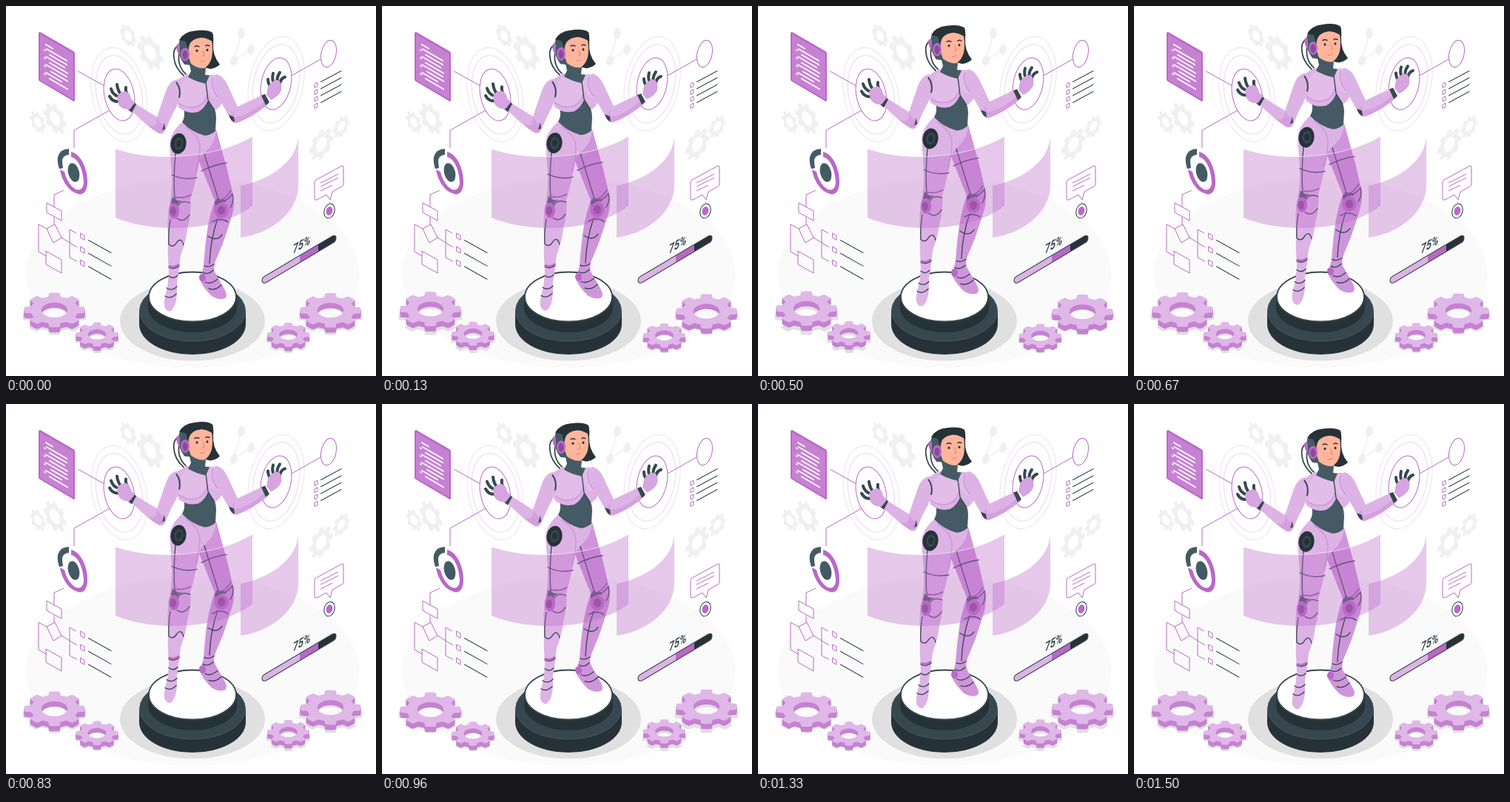
An HTML page that plays this animation: 500 by 500 pixels, repeating every 1.54 s.

```html
<!DOCTYPE html>
<html lang="en">
<head>
<meta charset="utf-8">
<title>Robot hologram</title>
<style>
html, body { margin: 0; width: 100%; height: 100%; overflow: hidden; background: #fff; }
svg { display: block; width: 100vw; height: 100vh; }
.ln { fill: none; stroke: #ba68c8; stroke-width: 1; }
.dk { fill: none; stroke: #37474f; stroke-width: 1.1; stroke-linecap: round; }
.seam { fill: none; stroke: #37474f; stroke-width: 1.3; stroke-linecap: round; }
.finger { fill: none; stroke: #37474f; stroke-width: 4; stroke-linecap: round; }
.pale { fill: #e1bde8; }
.light { fill: #ddb3e6; }
.hand { fill: #d6a4e0; }
.mid { fill: #cf95db; }
.purple { fill: #ba68c8; }
.plum { fill: #8a4b96; }
.slate { fill: #455a64; }
.steel { fill: #37474f; }
.ink { fill: #263238; }
</style>
</head>
<body>
<svg viewBox="0 0 500 500" xmlns="http://www.w3.org/2000/svg">
  <ellipse cx="252" cy="361" rx="225.500" ry="128" fill="#fafafa"/>
  <g id="faint" fill="#f0f0f0" fill-rule="evenodd"></g>
  <g fill="#f0f0f0" stroke="#f0f0f0" stroke-width="1.500">
    <path d="M331 59L308 74L318 37" fill="none"/>
    <ellipse cx="318" cy="37" rx="4" ry="6.500" transform="rotate(14 318 37)"/>
    <ellipse cx="331" cy="59" rx="4" ry="6.500" transform="rotate(14 331 59)"/>
    <ellipse cx="308" cy="74" rx="4" ry="6.500" transform="rotate(14 308 74)"/>
  </g>

  <!-- platform -->
  <ellipse cx="252" cy="425.500" rx="98" ry="54" fill="#e0e0e0"/>
  <path class="ink" d="M180 411V430A72 41 0 0 0 324 430V411Z"/>
  <ellipse class="steel" cx="252" cy="412" rx="71.500" ry="41" stroke="#455a64"/>
  <path class="ink" d="M192 393V407A60 34 0 0 0 312 407V393Z"/>
  <ellipse cx="252" cy="393" rx="59" ry="33.500" fill="#fff" stroke="#37474f" stroke-width="1.800"/>

  <g id="rings" fill="none"></g>

  <g id="body">
    <!-- far leg -->
    <path class="mid" d="M258 200Q266 180 284 166Q292 195 299 220L306 250Q310 265 306 280Q300 300 293 320L283 344Q279 355 284 362L296 383Q300 391 296 394Q288 397 278 391Q267 380 263 371Q264 362 267 350Q269 320 273 296Q276 280 282 262L262 212Z"/>
    <path class="seam" d="M268 199Q277 228 287 260M264 222Q282 213 298 211M286 286Q276 316 275 347M273 310Q285 318 292 308M279 291Q290 284 300 291M268 350Q274 353 281 348M266 359Q273 363 280 356M269 372Q276 376 286 368M274 381Q283 384 291 376"/>
    <path class="slate" d="M282 264L286 258Q291 262 295 260L298 264Q288 262 283 272Z"/>
    <path d="M284 261Q296 263 304 248" fill="none" stroke="#8a4b96" stroke-width="1.500"/>
    <path d="M296 262Q302 259 306 253Q309 262 303 272" class="seam" stroke-width="2"/>
    <ellipse class="purple" cx="291" cy="275" rx="9.500" ry="10.500"/>
    <ellipse class="plum" cx="291" cy="275" rx="5" ry="6"/>
    <ellipse class="purple" cx="265.500" cy="366" rx="4.500" ry="5.500"/>
    <!-- near leg -->
    <path class="light" d="M238 156Q222 170 221 186L224 225Q225 246 222 262Q217 285 219 310Q218 335 220 360L218 380Q213 395 214 405Q217 413 223 411Q230 405 231 388L231 374Q234 355 236 336Q244 315 245 300Q251 280 249 262Q257 235 261 207Q265 200 273 193Q283 183 284 166Q268 179 238 156Z"/>
    <path d="M243 163Q261 174 262 190Q262 205 257 224" fill="none" stroke="#cf95db" stroke-width="1.500"/>
    <path class="seam" d="M229 198Q226 232 228 260M224 227Q241 235 258 231M249 265Q236 260 232 270M231 286Q240 293 248 281M222 288Q219 305 220 321Q226 327 231 318Q237 311 240 322M220 352Q227 356 234 350M220 364Q226 369 232 363M217 380Q224 385 231 378M215 391Q222 396 230 388"/>
    <path class="slate" d="M225 257L232 262L238 262Q233 264 231 269L223 266Z"/>
    <path d="M227 257Q240 260 250 254" fill="none" stroke="#8a4b96" stroke-width="1.500"/>
    <path d="M220 350Q227 354 234 348" fill="none" stroke="#ba68c8" stroke-width="2.500"/>
    <ellipse class="purple" cx="227" cy="276" rx="7" ry="10.500"/>
    <ellipse class="plum" cx="226" cy="276.500" rx="4" ry="6"/>
    <g transform="rotate(8 233 185)">
      <ellipse class="ink" cx="233" cy="185" rx="10.500" ry="14"/>
      <ellipse class="steel" cx="233.500" cy="185" rx="6" ry="8.500"/>
      <ellipse class="ink" cx="233.500" cy="185" rx="3.500" ry="5"/>
    </g>
    <!-- torso -->
    <path class="slate" d="M240 137Q254 145 266 135L275 124Q284 138 284 150L283 168Q276 174 268 174Q250 169 238 156Q243 148 240 137Z"/>
    <path class="light" d="M246 91Q236 95 229 101L234 122Q231 131 233 136Q246 146 260 142Q269 137 273 126L283 140Q294 132 296 118Q293 100 286 92L272 92Z"/>
    <path class="pale" d="M246 95Q236 100 236 116Q233 125 233 130Q245 139 259 134Q270 128 272 116L269 103Q256 101 246 95ZM274 94Q270 102 275 118Q281 127 293 124Q296 118 293 108Q289 96 284 92Z"/>
    <path d="M233 130Q246 140 261 134Q270 129 272 118" fill="none" stroke="#cf95db" stroke-width="1.500"/>
    <path class="seam" d="M270 102L273 126L281 139"/>
    <path class="slate" d="M247 74L270 83L269 92L275 93L270 104Q256 101 246 95L250 87Z"/>
    <!-- arms -->
    <path class="light" d="M231 98Q221 100 216 114L204 149L175 131L168 139Q190 161 206 171Q213 174 216 166Q222 150 229 138L236 122Q238 107 231 98Z"/>
    <path d="M230 102Q237 111 234 123" fill="none" stroke="#37474f" stroke-width="2"/>
    <path class="steel" d="M214 157L215 165L210 168Z"/>
    <path class="mid" d="M204 149L210 158L214 157L211 170L207 171Q199 167 190 159Q205 166 204 149Z" opacity=".65"/>
    <path class="steel" d="M172 128L176 132L170 143L165 139Z"/>
    <g class="finger">
      <path d="M153 128Q144 129 140 121"/>
      <path d="M153 122Q144 119 142 111"/>
      <path d="M156 119Q151 114 150 105"/>
      <path d="M165 120Q161 115 162 109"/>
    </g>
    <path class="hand" d="M150 122Q153 115 161 114Q168 116 169 124L174 130L167 139Q156 139 152 132Z"/>
    <path class="light" d="M284 91Q294 93 300 107L313 135L347 119L355 131Q334 149 312 157Q305 158 302 149L290 128Q275 108 284 91Z"/>
    <path d="M280 95Q275 107 286 122" fill="none" stroke="#cf95db" stroke-width="1.500"/>
    <path class="mid" d="M313 135Q307 141 309 149Q329 147 350 127L355 131Q334 149 312 157Q306 157 302 149Z" opacity=".6"/>
    <path class="steel" d="M301 146L308 149L309 156Q304 155 301 146ZM345 120L350 118L356 129L351 133Z"/>
    <g class="finger">
      <path d="M359 109Q354 105 354 98"/>
      <path d="M362 104Q359 97 361 90"/>
      <path d="M367 103Q365 96 370 89"/>
      <path d="M370 104Q371 97 377 95"/>
    </g>
    <path class="hand" d="M354 108Q359 99 368 99Q374 103 372 113Q369 121 358 126L352 119Z"/>
    <!-- head -->
    <path class="dk" d="M235 52Q225 55 227 69Q228 82 240 93M234 62Q231 80 243 91" style="stroke-width:1.800"/>
    <path class="ink" d="M262 40L279 37Q281 42 280 50Q279 66 289 78Q284 83 276 84L268 82Z"/>
    <path class="slate" d="M233 53Q234 43 239 39L251 42L250 79L241 78Q232 66 233 53Z"/>
    <path d="M248 47Q256 44 262 41Q271 42 278 46Q280 58 278 69Q275 79 268 83Q259 84 250 77L246 66Z" fill="#ffb59b"/>
    <path class="ink" d="M234 45Q240 34 255 32.500Q271 30 279 35Q281 41 279 47Q270 41 262 42Q251 44 248 51L246 57L243 47Z"/>
    <path d="M255 54Q258 52 261 54M270 53Q272 51 275 53" class="dk" style="stroke:#263238;stroke-width:1.400"/>
    <ellipse class="ink" cx="258" cy="59.500" rx="1.500" ry="1.800"/>
    <ellipse class="ink" cx="272" cy="58.500" rx="1.500" ry="1.800"/>
    <path d="M266 59L268 66L265 67M262 74Q266 75 269 72" fill="none" stroke="#e5806a"/>
    <path d="M230 53Q232 48 235 52L235 66Q231 63 230 53Z" class="purple"/>
    <ellipse class="purple" cx="242" cy="64.500" rx="6" ry="9"/>
    <ellipse class="plum" cx="242" cy="65" rx="3.500" ry="6"/>
  </g>

  <!-- hologram screens -->
  <g fill="#ba68c8" fill-opacity=".36">
    <path d="M148 193C205 212 285 205 333 176V270C290 305 200 308 148 286Z"/>
    <path d="M317 243C355 235 392 212 395 177V246C392 282 355 308 317 313Z"/>
  </g>
  <path d="M148 193C205 212 285 205 333 176" fill="none" stroke="#fff" stroke-opacity=".6"/>

  <!-- document -->
  <path class="purple" d="M46 35L91 61Q93 62 93 64V128Q92 130 90 128L46 102Q44 101 44 99V37Q44 35 46 35Z"/>
  <path d="M46 38L91 64V126L46 100Z" fill="#c781d3"/>
  <g id="rows" transform="matrix(1 .58 0 1 45 36)" stroke="#fff" stroke-width="2" stroke-linecap="round"></g>

  <g class="ln">
    <path d="M97 88L133 108M140 141L92 168V192M386 94L425 72"/>
    <ellipse cx="436" cy="64.500" rx="10" ry="18.500" transform="rotate(12 436 64.500)"/>
    <path d="M78 249L65 255V272M55 266L75 277V290L55 279ZM65 285V295M55 301L66 295L75 313L64 320ZM55 301L44 295V332L54 338M54 331L75 343V361L54 349ZM75 313L96 326M95 307L86 302V340L96 345"/>
    <path d="M419 235L454 216Q456 215 456 218V241Q456 243 454 244L441 251L438 262L433 255L420 262Q417 263 417 260V239Q417 236 419 235ZM425 239L449 227M425 244L449 232M425 250L441 242"/>
  </g>
  <g id="lists"></g>

  <!-- donut chart -->
  <path class="purple" d="M88 197C102 200 111 222 110 240C109 253 102 257 95 253C83 249 75 234 73 221L79 224C81 234 88 245 95 248C102 250 105 245 105 237C104 222 98 206 88 204Z"/>
  <path class="slate" d="M72 220Q69 211 70 204Q73 193 85 193L85 201Q77 202 76 208Q76 213 77 219Z"/>
  <ellipse class="slate" cx="91.500" cy="225" rx="7.500" ry="13" transform="rotate(-14 91.500 225)"/>

  <g transform="rotate(16 437 277)">
    <ellipse cx="437" cy="277" rx="7" ry="10" fill="#fff" stroke="#37474f" stroke-width="1.100"/>
    <ellipse class="purple" cx="437" cy="277" rx="4.300" ry="6"/>
  </g>

  <!-- progress bar -->
  <clipPath id="bar"><path d="M350 365L441 311Q446 309 446 313Q446 318 442 320L351 374Q346 375 346 371Q346 367 350 365Z"/></clipPath>
  <g clip-path="url(#bar)">
    <path class="light" d="M340 300H397V380H340Z"/>
    <path class="purple" d="M397 300H422V380H397Z"/>
    <path class="ink" d="M422 300H450V380H422Z"/>
  </g>
  <path class="dk" d="M350 365L441 311Q446 309 446 313Q446 318 442 320L351 374Q346 375 346 371Q346 367 350 365Z"/>
  <text transform="matrix(.76 -.44 -.14 1.080 387 335)" font-family="Roboto, Arial, sans-serif" font-weight="600" font-size="16.500" fill="#37474f">75%</text>

  <g id="gears" fill-rule="evenodd"></g>
</svg>
<script>
const LOOP = 1540;
const $ = id => document.getElementById(id);

function add(parent, tag, attrs) {
  const el = document.createElementNS('http://www.w3.org/2000/svg', tag);
  for (const k in attrs) el.setAttribute(k, attrs[k]);
  return parent.appendChild(el);
}

function gearPath(R, hole, teeth = 8) {
  const root = R * 0.79;
  const at = (r, a) => `${(r * Math.cos(a)).toFixed(2)} ${(r * Math.sin(a)).toFixed(2)}`;
  let d = '';
  for (let i = 0; i < teeth; i++) {
    const a = i * 2 * Math.PI / teeth;
    d += (i ? `A${root} ${root} 0 0 1 ` : 'M') + at(root, a - 0.26);
    d += `L${at(R, a - 0.17)}A${R} ${R} 0 0 1 ${at(R, a + 0.17)}L${at(root, a + 0.26)}`;
  }
  return `${d}A${root} ${root} 0 0 1 ${at(root, -0.26)}Z` +
    `M${hole} 0A${hole} ${hole} 0 1 0 ${-hole} 0A${hole} ${hole} 0 1 0 ${hole} 0Z`;
}

// wall gears: x, y, radius, slope
[[195, 63, 21, .5], [165, 40, 13.5, .5], [43, 157, 13, .5], [66, 152, 18.5, .5],
 [426, 187, 19, -.5], [453, 163, 13.5, -.5]].forEach(([x, y, r, k]) =>
  add($('faint'), 'path', { d: gearPath(r, r * .46), transform: `matrix(.84 ${k} 0 1.05 ${x} ${y})` }));

// rings around the hands
[[153, 120, -12], [365, 105, 12]].forEach(([x, y, tilt]) =>
  [[1, '#ba68c8'], [1.52, '#ecd6f0'], [1.82, '#f0e0f3']].forEach(([s, stroke]) =>
    add($('rings'), 'ellipse', { cx: x, cy: y, rx: 20 * s, ry: 35.5 * s, stroke, transform: `rotate(${tilt} ${x} ${y})` })));

// text rows of the document
[[9, 18], [10, 37], [14, 37], [9, 34], [14, 38], [9, 37], [16, 38], [9, 30], [14, 38]].forEach(([a, b], i) => {
  const y = 11 + i * 5.4;
  add($('rows'), 'path', { d: `M${a} ${y}H${b}` });
  if (i % 2) add($('rows'), 'path', { d: `M7 ${y + 3}h1` });
});

// check lists
function item(x, y, w, h, k, x1, x2, yl) {
  add($('lists'), 'path', { class: 'ln', d: `M${x} ${y}l${w} ${w * k}v${h}l${-w} ${-w * k}Z` });
  add($('lists'), 'path', { class: 'dk', d: `M${x1} ${yl}L${x2} ${yl + (x2 - x1) * k}` });
}
for (let i = 0; i < 4; i++) item(417, 105.5 + i * 9.3, 4, 5, -.54, 425.5, 453, 102.5 + i * 9.3);
for (let i = 0; i < 3; i++) item(100.5, 307 + i * 18, 5.5, 6, .56, 111.5, 142, 316.5 + i * 17.8);

// floor gears: x, y, radius, depth, swing
const gears = [[65.5, 411, 41, 7, 2.6], [123, 444, 28.5, 6, 2], [438.5, 411, 41, 7, -2.6], [381.5, 444, 28.5, 6, -2]]
  .map(([x, y, r, depth, swing]) => {
    const d = gearPath(r, r * .43);
    const layer = (parent, dy, fill, s = 1) =>
      add(parent, 'path', { d, fill, transform: `translate(0 ${dy}) scale(${s} ${s * .57})` });
    const base = add($('gears'), 'g', { transform: `translate(${x} ${y})` });
    layer(base, depth + 2, '#e0e0e0', 1.05);
    const top = add(base, 'g', {});
    for (let k = depth; k > 0; k--) layer(top, k, '#c681d2');
    layer(top, 0, '#dfb8e7');
    return { top, swing };
  });

function draw(now) {
  const p = 2 * Math.PI * (now % LOOP + 20) / LOOP;
  $('body').setAttribute('transform', `translate(0 ${1 - 4.4 * (1 - Math.cos(p))})`);
  for (const { top, swing } of gears) top.setAttribute('transform', `translate(0 ${-swing * Math.sin(p)})`);
}

const start = performance.now();
function tick() {
  draw(performance.now() - start);
  requestAnimationFrame(tick);
}
tick();
</script>
</body>
</html>
```
